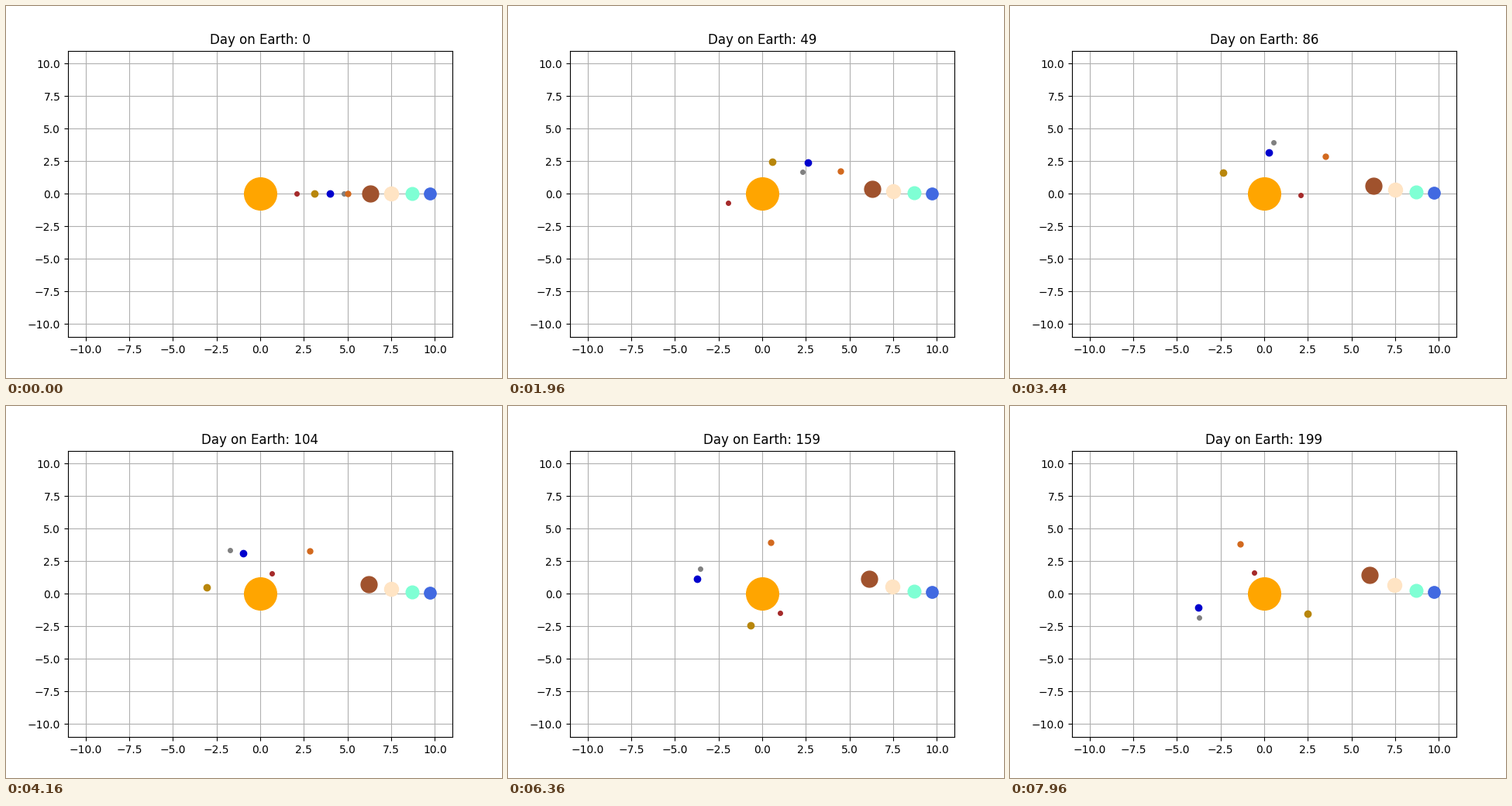
Recreate the animation shown at these times as a matplotlib script. Size 640 by 480 pixels, loop 8000 ms.

```python
import numpy as np
import matplotlib.pyplot as plt
from matplotlib.animation import FuncAnimation

DAYS = 200
FLATTENING = 0.8
EARTH_AXIS = 4.0
MOON_RADIUS, MOON_RATE = 0.8, 5.0

# semi-major axis, orbital period in days, marker size, colour
PLANETS = [
    (2.1, 88, 4, "brown"),
    (3.1, 225, 6, "darkgoldenrod"),
    (EARTH_AXIS, 365, 6, "mediumblue"),
    (5.0, 687, 5, "chocolate"),
    (6.3, 4333, 15, "sienna"),
    (7.5, 10759, 13, "bisque"),
    (8.7, 30687, 12, "aquamarine"),
    (9.7, 60190, 11, "royalblue"),
]


def orbit(axis, period, day):
    """Position on an ellipse; Earth advances one degree per day."""
    angle = np.radians(day * 365 / period)
    return axis * np.cos(angle), FLATTENING * axis * np.sin(angle)


def moon_position(day):
    x, y = orbit(EARTH_AXIS, 365, day)
    angle = np.radians(MOON_RATE * day)
    return x + MOON_RADIUS * np.cos(angle), y + MOON_RADIUS * np.sin(angle)


fig, ax = plt.subplots(figsize=(6.4, 4.8), dpi=100)
ax.set_xlim(-11, 11)
ax.set_ylim(-11, 11)
ax.grid(True)
title = ax.set_title("Day on Earth: 0")


def body(size, color):
    return ax.plot([0], [0], "o", markersize=size, color=color)[0]


sun = body(30, "orange")
moon = body(4, "gray")
planets = [body(size, color) for _, _, size, color in PLANETS]


def update(day):
    for dot, (axis, period, _, _) in zip(planets, PLANETS):
        x, y = orbit(axis, period, day)
        dot.set_data([x], [y])
    x, y = moon_position(day)
    moon.set_data([x], [y])
    title.set_text(f"Day on Earth: {day}")
    return [*planets, moon, title]


anim = FuncAnimation(fig, update, frames=DAYS, interval=40,
                     init_func=lambda: update(0), blit=False, repeat=True)
plt.show()
```
